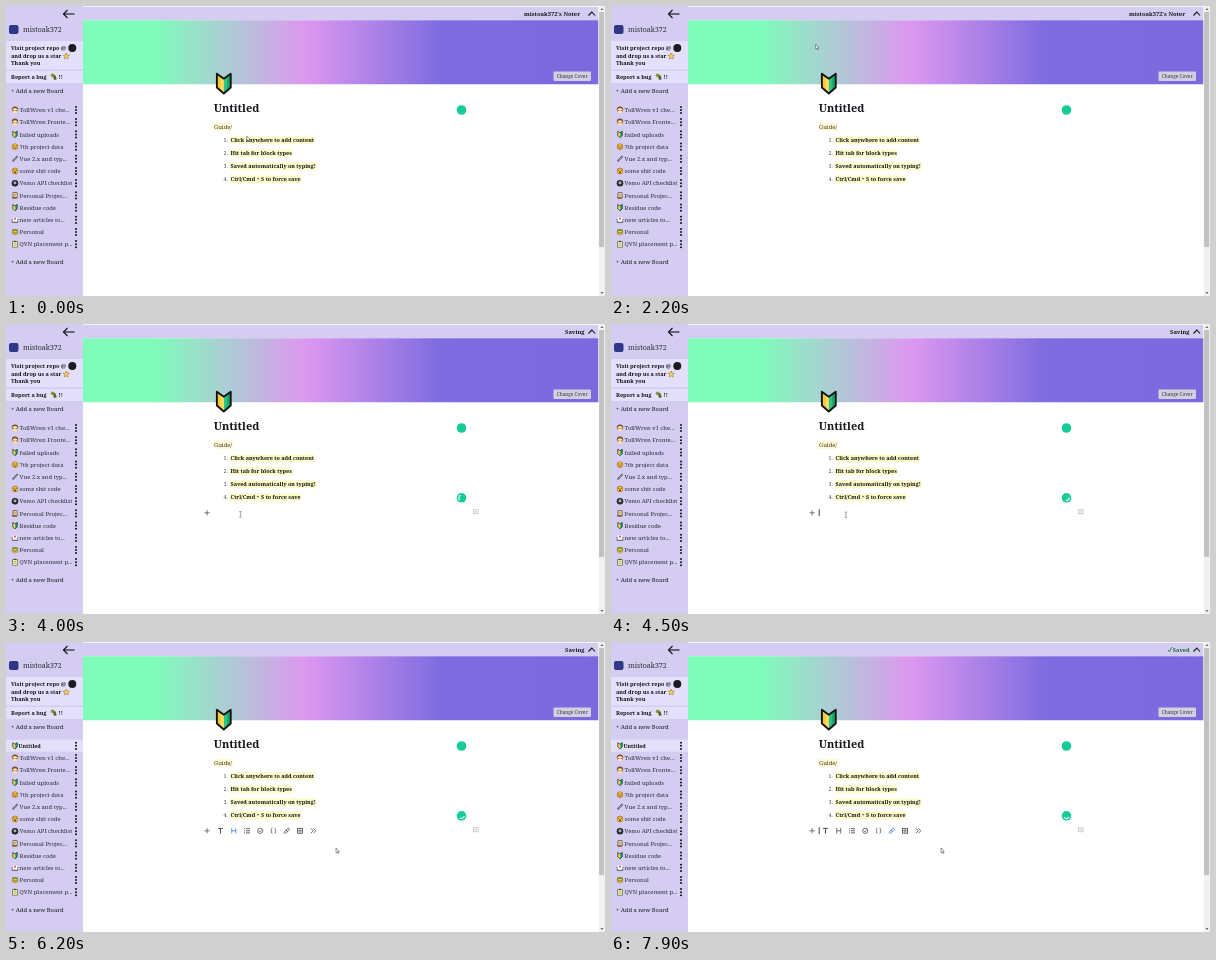
Animation of 599 by 290 pixels, one loop 8 s. Source, as an HTML page with a canvas:

```html
<!DOCTYPE html>
<html lang="en">
<head>
<meta charset="utf-8">
<title>Notes</title>
<style>
html, body { margin: 0; width: 100%; height: 100%; overflow: hidden; background: #fff; }
canvas { display: block; width: 599px; height: 290px; }
</style>
</head>
<body>
<canvas id="stage"></canvas>
<script>
const W = 599, H = 290, LOOP = 8000;
const canvas = document.getElementById('stage');
const ctx = canvas.getContext('2d');
const ratio = window.devicePixelRatio || 1;
canvas.width = W * ratio;
canvas.height = H * ratio;

const LILAC = '#d4cdf1', PALE = '#e4dffa', INK = '#16161c', BLUE = '#3d7fe6', GREEN = '#15cb98';

// Times of the state changes, in ms
const ADD_LINE = 3400, SAVING = 3500, CHECKING = 3700, TOOLBAR = 4950;
const HOVER = 5150, LEAVE = 5750, LISTED = 5900, SAVED = 7000;
const TOOL_STEPS = [5850, 6500, 6900, 7300, 7650];

// Pointer path: time, x, y
const PATH = [
  [0, 241, 130], [300, 200, 175], [500, 270, 208], [700, 352, 150], [900, 300, 50],
  [1100, 185, 46], [1300, 139, 110], [1500, 230, 190], [1700, 376, 130], [1900, 310, 50],
  [2050, 260, 24], [2200, 205, 38], [2400, 160, 100], [2600, 240, 190], [2800, 350, 120],
  [3000, 290, 128], [3200, 247, 141], [3500, 234, 190], [4800, 235, 191], [5150, 238, 198],
  [5650, 239, 199], [6000, 330, 206], [8000, 330, 206]
];

const ITEMS = [
  ['face', 'TollWren v1 che...'], ['face', 'TollWren Fronte...'], ['leaf', 'failed uploads'],
  ['smile', '7th project data'], ['pen', 'Vue 2.x and typ...'], ['gasp', 'some shit code'],
  ['ball', 'Vemo API checklist'], ['scroll', 'Personal Projec...'], ['leaf', 'Residue code'],
  ['inbox', 'new articles to...'], ['cap', 'Personal'], ['board', 'QVN placement p...']
];

const GUIDE = ['Click anywhere to add content', 'Hit tab for block types',
  'Saved automatically on typing!', 'Ctrl/Cmd + S to force save'];

function rect(x, y, w, h, color, r = 0) {
  ctx.fillStyle = color;
  ctx.beginPath();
  ctx.roundRect(x, y, w, h, r);
  ctx.fill();
}

function disc(x, y, r, color) {
  ctx.fillStyle = color;
  ctx.beginPath();
  ctx.arc(x, y, r, 0, Math.PI * 2);
  ctx.fill();
}

function line(points, color, width = 0.8) {
  ctx.strokeStyle = color;
  ctx.lineWidth = width;
  ctx.beginPath();
  points.forEach(([x, y], i) => i ? ctx.lineTo(x, y) : ctx.moveTo(x, y));
  ctx.stroke();
}

function poly(points, fill, stroke, width = 0.8) {
  ctx.beginPath();
  points.forEach(([x, y], i) => i ? ctx.lineTo(x, y) : ctx.moveTo(x, y));
  ctx.closePath();
  if (fill) { ctx.fillStyle = fill; ctx.fill(); }
  if (stroke) { ctx.strokeStyle = stroke; ctx.lineWidth = width; ctx.stroke(); }
}

function text(str, x, y, size, { weight = 400, color = INK, align = 'left' } = {}) {
  ctx.font = `${weight} ${size}px "Noto Serif", serif`;
  ctx.fillStyle = color;
  ctx.textAlign = align;
  ctx.fillText(str, x, y);
}

function at(x, y, scale, draw) {
  ctx.save();
  ctx.translate(x, y);
  ctx.scale(scale, scale);
  draw();
  ctx.restore();
}

// Two-tone shield in a 16 x 22 box centred on the origin
function leaf(x, y, scale) {
  at(x, y, scale, () => {
    const half = s => [[0, -5], [7 * s, -10], [7 * s, 4], [0, 10]];
    ctx.lineJoin = 'round';
    poly(half(-1), '#f9c83a');
    poly(half(1), '#18a96c');
    poly([[0, -5], [3.2, -7.4], [3.2, 7], [0, 10]], '#2cc488');
    poly([[0, -5], [-3.2, -7.4], [-3.2, 7], [0, 10]], '#ffdb62');
    poly([[0, -5], [7, -10], [7, 4], [0, 10], [-7, 4], [-7, -10]], null, '#111', 1.9);
    ctx.lineJoin = 'miter';
  });
}

function eyes(y) {
  disc(-1.2, y, 0.5, '#3a2a10');
  disc(1.2, y, 0.5, '#3a2a10');
}

const ICONS = {
  face() {
    disc(0, -0.4, 3.2, '#7a4a22');
    disc(0, 0.7, 2.6, '#ffe0b0');
    eyes(0.5);
  },
  leaf() { leaf(0, 0, 0.32); },
  smile() {
    disc(0, 0, 3.2, '#a87420');
    disc(0, 0, 2.6, '#f2bc44');
    eyes(-0.5);
    line([[-1.3, 1.2], [0, 1.8], [1.3, 1.2]], '#5a3a10', 0.7);
  },
  pen() {
    line([[-2.4, 2.6], [2.6, -2.6]], '#4a4a58', 1.7);
    line([[-1.6, 1.8], [2.2, -2.2]], '#c9c9d4', 0.7);
  },
  gasp() {
    disc(0, 0, 3.2, '#a87420');
    disc(0, 0, 2.6, '#f2bc44');
    eyes(-0.7);
    disc(0, 1.3, 0.9, '#3a2a10');
  },
  ball() {
    disc(0, 0, 3.3, '#26262c');
    disc(0, -0.3, 1.4, '#e8e8ee');
    disc(0, -0.3, 0.6, '#26262c');
  },
  scroll() {
    rect(-2.4, -3.2, 4.9, 6.4, '#5e4426', 0.8);
    rect(-1.6, -2.5, 3.4, 4.4, '#f4e2c0');
    rect(-3, 1.7, 4.4, 1.5, '#8a6236', 0.6);
    line([[-1, -1.2], [1.2, -1.2]], '#7a5426', 0.5);
    line([[-1, 0.4], [1.2, 0.4]], '#7a5426', 0.5);
  },
  inbox() {
    rect(-3.2, -1, 6.4, 4, '#4a4a58', 0.5);
    rect(-2.5, -2.4, 5, 4.4, '#fff');
    poly([[-1.2, -2], [1.2, -2], [0, 0.6]], '#d6455b');
  },
  cap() {
    disc(0, 0.1, 3.2, '#6b6a26');
    disc(0, 0.4, 2.6, '#ecc654');
    rect(-2.8, -2.7, 5.6, 1.6, '#7f9a44', 0.8);
    eyes(0.3);
    line([[-1.2, 1.7], [1.2, 1.7]], '#5a3a10', 0.6);
  },
  board() {
    rect(-2.8, -3, 5.6, 6.3, '#5d6630', 0.6);
    rect(-2.1, -2.2, 4.2, 4.9, '#f4efb0');
    rect(-1.1, -3.4, 2.2, 1.3, '#4a4a40');
    line([[-1.3, -0.5], [1.3, -0.5]], '#777', 0.5);
    line([[-1.3, 1], [1.3, 1]], '#777', 0.5);
  }
};

function row(icon, label, y, active) {
  if (active) rect(0, y - 6, 77, 12, PALE);
  at(9, y, 1, ICONS[icon]);
  text(label, active ? 12.5 : 13.6, y + 2.1, active ? 5.4 : 5.85,
    { weight: active ? 700 : 400, color: active ? INK : '#2b2b36' });
  for (const d of [-3.1, 0, 3.1]) disc(70, y + d, 1, '#111');
}

function sidebar(t) {
  rect(0, 0, 77, H, LILAC);
  line([[68.5, 8], [57.5, 8]], '#111', 1.1);
  line([[61.5, 4], [57.5, 8], [61.5, 12]], '#111', 1.1);
  rect(3, 19, 9.5, 9, '#2f3886', 2);
  text('mistoak372', 17, 26, 7.1, { color: '#2b2b36' });

  rect(0, 35, 77, 28.5, PALE);
  rect(0, 65, 77, 12, PALE);
  const bold = { weight: 700 };
  text('Visit project repo @', 5, 44, 5.5, bold);
  disc(66.3, 42, 4, '#1b1b20');
  text('and drop us a star', 5, 52, 5.5, bold);
  const star = Array.from({ length: 10 }, (_, i) => {
    const a = -Math.PI / 2 + i * Math.PI / 5, r = i % 2 ? 1.5 : 3.3;
    return [60.3 + r * Math.cos(a), 50.3 + r * Math.sin(a)];
  });
  poly(star, '#ffd45c', '#8a6420', 0.5);
  text('Thank you', 5, 59, 5.5, bold);
  text('Report a bug', 5, 73, 5.5, bold);
  line([[46, 69], [48.4, 70.4], [49.4, 73.6]], '#4f6a22', 2.8);
  disc(46.6, 69.3, 1.8, '#7f9a34');
  text('!!', 52.6, 73, 5.5, bold);

  text('+ Add a new Board', 5, 87.2, 5.85);
  const listed = t >= LISTED, top = listed ? 116 : 104;
  if (listed) row('leaf', 'Untitled', 103.8, true);
  ITEMS.forEach(([icon, label], i) => row(icon, label, top + i * 12.2, false));
  text('+ Add a new Board', 5, top + 154.2, 5.85);
}

function header(t) {
  rect(77, 0.7, 515.4, 13.5, LILAC);
  const opt = { weight: 600 };
  if (t < SAVING) text("mistoak372's Noter", 518, 9.5, 5.8, opt);
  else if (t < SAVED) text('Saving', 559, 9.5, 5.8, opt);
  else {
    line([[557, 7.8], [558.4, 9.6], [561, 5]], '#1c7a3a', 0.9);
    text('Saved', 561.8, 9.5, 5.6, { weight: 600, color: '#1c6a36' });
  }
  line([[582.5, 9.5], [585.8, 6], [589, 9.5]], '#111', 1.1);

  const g = ctx.createLinearGradient(77, 0, 593, 0);
  [[0, '#7ffcba'], [0.14, '#7ffcba'], [0.43, '#dd98f0'], [0.69, '#7f6ce0'], [1, '#7c69de']]
    .forEach(([p, c]) => g.addColorStop(p, c));
  rect(77, 14.2, 515.4, 64, g);
  rect(547.5, 65.5, 37.5, 9.5, '#d3cfe2', 1);
  text('Change Cover', 566.2, 72, 4.7, { align: 'center', color: '#35353f' });
}

function scrollbar(t) {
  rect(592.7, 0, 6.3, H, '#f1f1f1');
  rect(593.1, 6, 5, t < ADD_LINE ? 235 : 227, '#c1c1c1');
  poly([[594.5, 4], [596, 2], [597.5, 4]], '#666');
  poly([[594.5, 286], [596, 288], [597.5, 286]], '#666');
}

function marked(str, x, y, size, color, weight, back) {
  ctx.font = `${weight} ${size}px "Noto Serif", serif`;
  rect(x - 0.5, y - 6, ctx.measureText(str).width + 1, 8, back);
  text(str, x, y, size, { color, weight });
}

function page(t) {
  leaf(217.8, 77.6, 0.99);
  text('Untitled', 207.7, 105.8, 11, { weight: 600 });
  marked('Guide/', 208, 122.8, 5.8, '#4a3d1a', 400, '#fdf8d6');
  GUIDE.forEach((str, i) => {
    const y = 136.2 + i * 13;
    text(`${i + 1}.`, 217.5, y, 5.2, { color: '#444' });
    marked(str, 224.5, y, 5.45, INK, 600, '#fdfccb');
  });
  disc(455.5, 104, 4.8, GREEN);
  if (t >= CHECKING) {
    disc(455.5, 173.8, 4.8, GREEN);
    const a = (80 / 360 + (t - 5400) / 825) * Math.PI * 2;
    ctx.strokeStyle = '#fff';
    ctx.lineWidth = 1.1;
    ctx.beginPath();
    ctx.arc(455.5, 173.8, 2.7, a - 1.1, a + 1.1);
    ctx.stroke();
  }
}

// Each tool is drawn around the origin in the given colour
const TOOLS = [
  c => { line([[-2.5, -2.4], [2.5, -2.4]], c, 1); line([[0, -2.4], [0, 2.8]], c, 1); },
  c => {
    line([[-2, -2.8], [-2, 2.8]], c);
    line([[2, -2.8], [2, 2.8]], c);
    line([[-2, 0], [2, 0]], c);
  },
  c => {
    for (const y of [-2.1, 0, 2.1]) {
      line([[-3, y], [-2, y]], c, 0.9);
      line([[-1, y], [3, y]], c, 0.9);
    }
  },
  c => {
    ctx.strokeStyle = c;
    ctx.lineWidth = 0.8;
    ctx.beginPath();
    ctx.arc(0, 0, 2.6, 0, Math.PI * 2);
    ctx.stroke();
    line([[-1.2, 0], [-0.3, 1], [1.3, -1]], c);
  },
  c => {
    for (const s of [-1, 1])
      line([[1.1 * s, -2.7], [1.9 * s, -2.2], [1.9 * s, -0.6], [2.7 * s, 0],
        [1.9 * s, 0.6], [1.9 * s, 2.2], [1.1 * s, 2.7]], c, 0.7);
  },
  c => {
    ctx.save();
    ctx.rotate(-Math.PI / 4);
    ctx.strokeStyle = c;
    ctx.lineWidth = 0.8;
    for (const x of [-3.2, -0.2]) {
      ctx.beginPath();
      ctx.roundRect(x, -1.1, 3.4, 2.2, 1.1);
      ctx.stroke();
    }
    ctx.restore();
  },
  c => {
    ctx.strokeStyle = c;
    ctx.lineWidth = 0.8;
    ctx.strokeRect(-2.6, -2.4, 5.2, 4.8);
    line([[-2.6, 0], [2.6, 0]], c, 0.7);
    line([[0, -2.4], [0, 2.4]], c, 0.7);
  },
  c => { for (const x of [-2.4, 0.2]) line([[x, -2.4], [x + 2.4, 0], [x, 2.4]], c); }
];

function editor(t) {
  if (t < ADD_LINE) return;
  line([[198.5, 188.8], [203.7, 188.8]], '#555');
  line([[201.1, 186.2], [201.1, 191.4]], '#555');
  if (t % 1000 >= 500) line([[208.2, 185.2], [208.2, 192.2]], '#111', 0.8);
  ctx.strokeStyle = '#b5b5bd';
  ctx.lineWidth = 0.7;
  ctx.strokeRect(467.5, 185.8, 4.6, 4);
  line([[468.5, 187.8], [471, 187.8]], '#b5b5bd', 0.7);
  if (t < TOOLBAR) return;

  const hover = t >= HOVER && t < LEAVE;
  const active = TOOL_STEPS.filter(s => t >= s).length;
  TOOLS.forEach((draw, i) => {
    const color = i === active || (hover && i === 2) ? BLUE : '#4c4c55';
    at(214.5 + i * 13.25, 188.8, 1, () => draw(color));
  });
  if (hover) {
    poly([[238.5, 199.5], [241, 197], [243.5, 199.5]], '#14161f');
    rect(226.3, 199, 29.5, 16, '#14161f', 2.5);
    text('List', 241, 205.8, 5, { color: '#f2f2f4', align: 'center' });
    text('Ctrl+⇧+L', 241, 212, 4.8, { color: '#8d8d98', align: 'center' });
  }
}

function pointerAt(t) {
  let i = 0;
  while (i < PATH.length - 2 && t >= PATH[i + 1][0]) i++;
  const a = PATH[i], b = PATH[i + 1];
  const before = PATH[Math.max(0, i - 1)], after = PATH[Math.min(PATH.length - 1, i + 2)];
  const span = b[0] - a[0], u = (t - a[0]) / span;
  const curve = k => {
    if (t >= 3200) return a[k] + (b[k] - a[k]) * u * u * (3 - 2 * u);
    const m0 = (b[k] - before[k]) / (b[0] - before[0]) * span;
    const m1 = (after[k] - a[k]) / (after[0] - a[0]) * span;
    const u2 = u * u, u3 = u2 * u;
    return (2 * u3 - 3 * u2 + 1) * a[k] + (u3 - 2 * u2 + u) * m0
      + (3 * u2 - 2 * u3) * b[k] + (u3 - u2) * m1;
  };
  return [curve(1), curve(2)];
}

function pointer(t) {
  const [x, y] = pointerAt(t);
  at(x, y, 1, () => {
    if (t >= 3100 && t < TOOLBAR) {
      line([[0, -2.8], [0, 2.8]], '#666', 0.6);
      line([[-1.2, -2.8], [1.2, -2.8]], '#666', 0.5);
      line([[-1.2, 2.8], [1.2, 2.8]], '#666', 0.5);
    } else if (t >= HOVER && t < LEAVE) {
      poly([[0, 0], [0.9, 0], [0.9, 2.2], [3, 2.8], [2.8, 5], [2.2, 6], [0, 6], [-1.6, 3.6], [-0.2, 3.8]],
        '#fff', '#222', 0.5);
    } else {
      poly([[0, 0], [0, 4.8], [1.1, 3.9], [1.9, 5.6], [2.6, 5.2], [1.9, 3.6], [3.3, 3.5]],
        '#fff', '#333', 0.5);
    }
  });
}

function frame(now) {
  const t = now % LOOP;
  ctx.setTransform(ratio, 0, 0, ratio, 0, 0);
  rect(0, 0, W, H, '#fff');
  sidebar(t);
  header(t);
  scrollbar(t);
  page(t);
  editor(t);
  pointer(t);
  requestAnimationFrame(frame);
}
requestAnimationFrame(frame);
</script>
</body>
</html>
```
